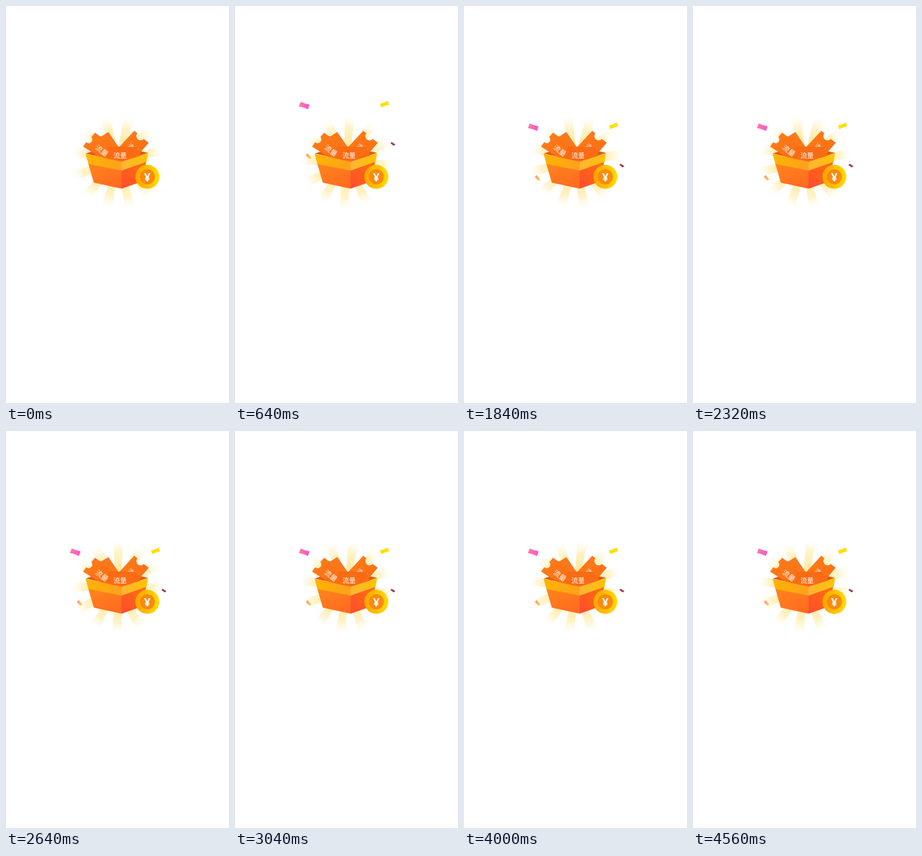
Write an HTML page that moves like this. It is 353x627 px and loops after 8080 ms.

```html
<!DOCTYPE html>
<html lang="zh">
<head>
<meta charset="utf-8">
<style>
  html, body { margin: 0; width: 100%; height: 100%; overflow: hidden; background: #fff; }
  svg { display: block; width: 100%; height: 100%; }
  text { fill: #fff; font-family: "Noto Sans CJK SC", "Noto Sans CJK", sans-serif; }
  .yen { font: 700 18px "Noto Sans", sans-serif; }
</style>
</head>
<body>
<svg viewBox="0 0 353 627">
  <defs>
    <radialGradient id="rayFill" gradientUnits="userSpaceOnUse" cx="0" cy="0" r="74">
      <stop offset=".45" stop-color="#ffeba6"/>
      <stop offset=".75" stop-color="#fff0bc" stop-opacity=".8"/>
      <stop offset="1" stop-color="#fff8dc" stop-opacity="0"/>
    </radialGradient>
    <linearGradient id="ticketFill" x2="1" y2="1">
      <stop stop-color="#ff7d18"/><stop offset="1" stop-color="#fa6c14"/>
    </linearGradient>
    <linearGradient id="bandLeft">
      <stop stop-color="#ffb400"/><stop offset="1" stop-color="#ffa01e"/>
    </linearGradient>
    <linearGradient id="bandRight">
      <stop stop-color="#ffb536"/><stop offset="1" stop-color="#ffc400"/>
    </linearGradient>
    <linearGradient id="faceLeft" x2=".6" y2="1">
      <stop stop-color="#ff861c"/><stop offset="1" stop-color="#ff6c20"/>
    </linearGradient>
    <linearGradient id="faceRight" x1="1" x2="0" y2="1">
      <stop stop-color="#ff7014"/><stop offset=".6" stop-color="#ff5c1e"/><stop offset="1" stop-color="#ff4a34"/>
    </linearGradient>
    <linearGradient id="coinFill">
      <stop stop-color="#ffa200"/><stop offset="1" stop-color="#ffdc00"/>
    </linearGradient>
    <linearGradient id="pink">
      <stop stop-color="#ff7f9c"/><stop offset="1" stop-color="#ff4ed6"/>
    </linearGradient>
    <linearGradient id="peach">
      <stop offset=".3" stop-color="#ff9c78"/><stop offset=".8" stop-color="#ffd23c"/>
    </linearGradient>
  </defs>

  <g id="rays" fill="url(#rayFill)"></g>

  <g id="confetti">
    <path fill="url(#pink)" d="M104 185.5Q111 189 118 190L115.5 197.5Q108 193.5 101 193Z"/>
    <path fill="#ffdf00" d="M229.5 188.5Q236 187.5 242 184L244 190Q238 191 231.5 194.5Z"/>
    <path fill="#9c4052" d="M248 249L254 253L251 255L246 251Z"/>
    <path fill="url(#peach)" d="M115 267L121 274L118 276L112 270Z"/>
  </g>

  <!-- box interior and tickets -->
  <path fill="#e55a0c" d="M126 233L141 228L182 222L225 232L183 246Z"/>
  <path fill="#f9781c" d="M147 205Q151 207 154 204L162 199L184 231L170 238Z"/>
  <path fill="url(#ticketFill)" d="M141 200L181 230L174 244L150 240L122 222L127 215A5.5 5.5 0 0 0 135 207Z"/>
  <path fill="url(#ticketFill)" d="M203 197L208 201A5.8 5.8 0 0 0 218 210L226 216L206 239L183 242L178 224Z"/>
  <text transform="translate(147.5 225) rotate(37)" x="-5.5" y="4.2" font-size="11">流量</text>
  <text transform="translate(198 221.5) rotate(38)" x="-4.5" y="3.5" font-size="9">流量</text>
  <path fill="#fa6c14" d="M164 223H208L214 239L183 247L153 240L160 237Z"/>
  <path fill="none" stroke="#ec5d10" stroke-width=".6" d="M164 223H208"/>
  <text x="180.5" y="239.7" font-size="10.5" text-anchor="middle">流量</text>

  <!-- box front -->
  <path fill="url(#faceLeft)" d="M130 248L183 259L183 288.5L139 279Z"/>
  <path fill="url(#faceRight)" d="M183 259L222 245L216 277L183 288.5Z"/>
  <path fill="url(#bandLeft)" d="M126 233.5L183 246L183 260L130.5 249.5Z"/>
  <path fill="url(#bandRight)" d="M183 246L225 232.5L222.5 246L183 260Z"/>

  <!-- coin -->
  <circle cx="223.7" cy="269.7" r="19" fill="url(#coinFill)"/>
  <circle cx="223.7" cy="269.7" r="12" fill="#fb890e"/>
  <text class="yen" x="223.7" y="277" text-anchor="middle">¥</text>
</svg>
<script>
  const LOOP = 8080, STEP = 80, LAST_STEP = 4560;
  const FALL_TIME = 1360, FALL_HEIGHT = 64.5, FADE_TIME = 400;
  const RAY_COUNT = 12;
  // [time in ms, ray rotation in degrees]
  const spin = [[0, 14], [640, -26.5], [1280, -65.5], [2320, -131.5],
                [3040, -171.5], [3600, -209.5], [4560, -262.5]];

  const rays = document.getElementById('rays');
  const confetti = document.getElementById('confetti');

  for (let i = 0; i < RAY_COUNT; i++) {
    const ray = document.createElementNS('http://www.w3.org/2000/svg', 'path');
    ray.setAttribute('d', 'M-3.5 0L-8 -74H8L3.5 0Z');
    ray.setAttribute('transform', `rotate(${i * 360 / RAY_COUNT})`);
    rays.append(ray);
  }

  function interpolate(keys, t) {
    const i = Math.max(1, keys.findIndex(([time]) => time >= t));
    const [t0, v0] = keys[i - 1], [t1, v1] = keys[i];
    return v0 + (v1 - v0) * (t - t0) / (t1 - t0);
  }

  function draw(now) {
    const t = Math.min(LAST_STEP, Math.floor(now % LOOP / STEP) * STEP);
    const rise = FALL_HEIGHT * Math.max(0, 1 - t / FALL_TIME);
    rays.setAttribute('transform', `translate(177 247) rotate(${interpolate(spin, t)})`);
    confetti.setAttribute('transform', `translate(0 ${-rise})`);
    confetti.setAttribute('opacity', Math.min(1, t / FADE_TIME));
  }

  let start;
  function tick(now) {
    start ??= now;
    draw(now - start);
    requestAnimationFrame(tick);
  }
  draw(0);
  requestAnimationFrame(tick);
</script>
</body>
</html>
```
